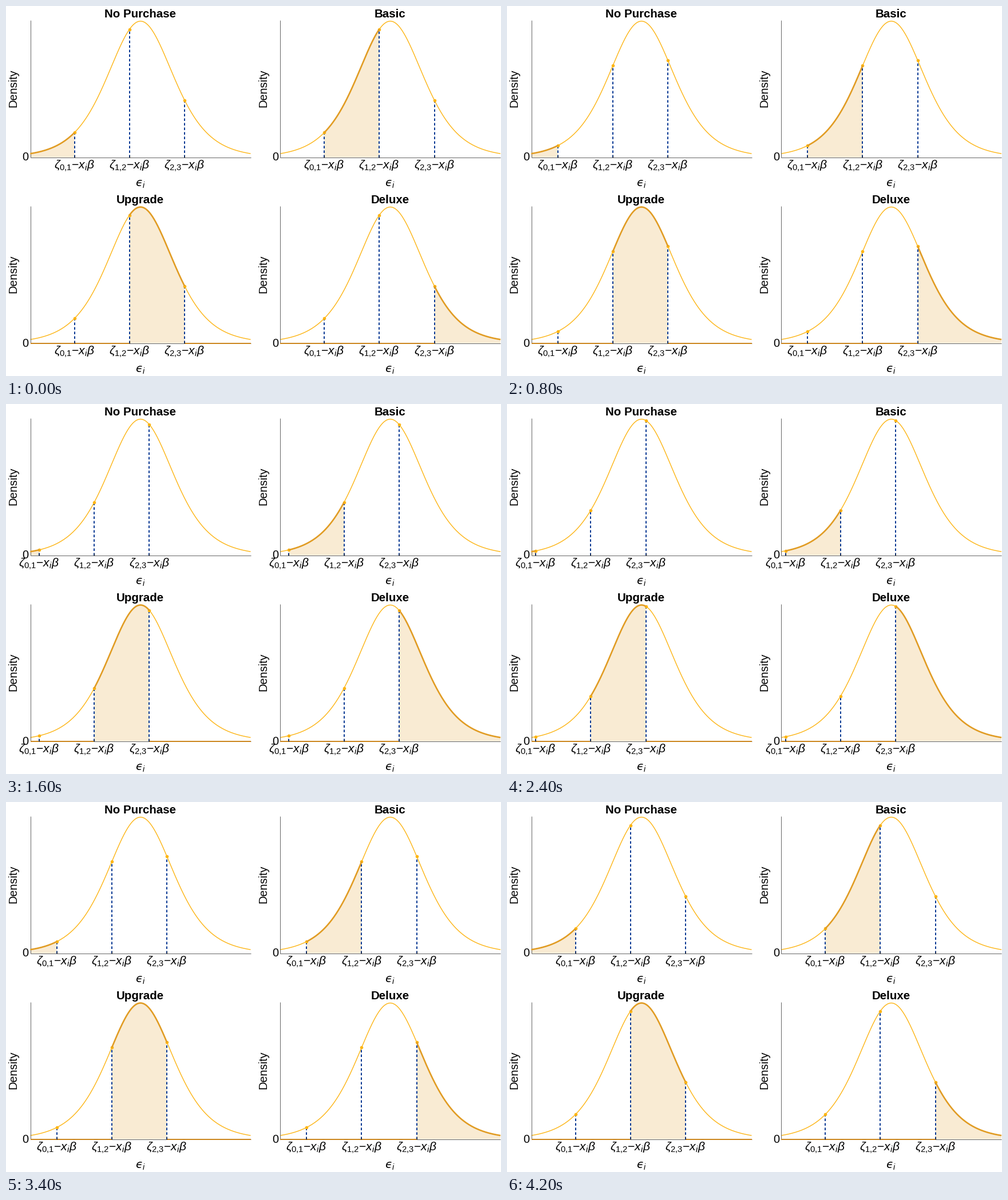
A matplotlib script that plays this animation: 865x647 px, repeating every 4.4 s.

```python
import numpy as np
import matplotlib.pyplot as plt
from matplotlib.animation import FuncAnimation

WIDTH, HEIGHT, DPI = 865, 647, 64
PT = 72 / DPI  # points per pixel

GOLD, ORANGE, BLUE, GRAY = "#fdb515", "#e19c24", "#0c3a94", "#666666"
UNIT = 38.5  # pixels per unit of epsilon
PEAK = 238   # pixel height of the density mode
EDGE = 5     # epsilon runs over [-EDGE, EDGE]
GAP = 2.5    # spacing of the cut points
STEPS = 11   # positions in each sweep direction

plt.rcParams.update({
    "font.family": "Liberation Sans",
    "mathtext.fontset": "custom",
    "mathtext.rm": "Liberation Sans",
    "mathtext.it": "Liberation Sans:italic",
    "mathtext.cal": "DejaVu Sans:italic",
})

fig = plt.figure(figsize=(WIDTH / DPI, HEIGHT / DPI), dpi=DPI, facecolor="white")
ax = fig.add_axes([0, 0, 1, 1])
ax.set_xlim(0, WIDTH)
ax.set_ylim(HEIGHT, 0)
ax.axis("off")


def density(x):
    """Logistic density scaled to a mode of one."""
    return 1 / np.cosh(np.asarray(x) / 2) ** 2


def stroke(xs, ys, color, width, **style):
    style = {"solid_capstyle": "butt", "dash_capstyle": "butt", **style}
    return ax.plot(xs, ys, color=color, lw=width * PT, **style)[0]


def write(x, y, text, size=20, **style):
    style = {"ha": "center", "va": "baseline", "zorder": 8, **style}
    return ax.text(x, y, text, fontsize=size * PT, color="black", **style)


class Panel:
    def __init__(self, title, region, center, base):
        self.region, self.center, self.base = region, center, base
        left, right = self.px(-EDGE), self.px(EDGE)

        write(center - 0.5, base - 244.5, title, 20.5, weight="bold")
        write(left - 24, base - 120.5, "Density", rotation=90, rotation_mode="anchor")
        write(left - 8.5, base + 6, "0")
        write(center - 0.5, base + 51.5, r"$\mathcal{ϵ}_i$")

        stroke([left, left], [base - 239.5, base + 0.5], GRAY, 1, zorder=3)
        stroke([left, right], [base, base], GRAY, 1, zorder=3)
        x = np.linspace(-EDGE, EDGE, 400)
        stroke(self.px(x), self.py(x), GOLD, 1.4, zorder=2)

        self.fill = ax.fill([left, left, left], [base] * 3, color=ORANGE,
                            alpha=0.2, lw=0, zorder=1)[0]
        self.curve = stroke([], [], ORANGE, 2.6, zorder=6)
        self.zeros = [stroke([], [], "#cb861e", 2, zorder=4) for _ in range(2)]
        self.drops = [stroke([], [], BLUE, 2, zorder=4,
                             dashes=(2.25, 1.75)) for _ in range(3)]
        self.ticks = [stroke([], [], "#222222", 1, zorder=4) for _ in range(3)]
        self.dots = stroke([], [], GOLD, 0, marker="o", ms=5.6 * PT, mew=0, zorder=5)
        self.labels = [
            write(0, base + 20, rf"$\zeta_{{{k}{{,}}{k + 1}}}{{-}}x_i\beta$", 21)
            for k in range(3)
        ]

    def px(self, x):
        return self.center + UNIT * np.asarray(x)

    def py(self, x):
        return self.base - PEAK * density(x)

    def update(self, cuts):
        bounds = [-EDGE, *cuts, EDGE]
        low, high = bounds[self.region], bounds[self.region + 1]
        x = np.linspace(low, high, 200)
        xs, ys = self.px(x), self.py(x)
        self.curve.set_data(xs, ys)
        outline = np.column_stack([xs, ys])
        corners = [[xs[-1], self.base], [xs[0], self.base]]
        self.fill.set_xy(np.vstack([outline, corners]))

        # The lower panels also trace the zero level outside their region.
        if self.region >= 2:
            for line, span in zip(self.zeros, ([-EDGE, low], [high, EDGE])):
                line.set_data(self.px(span), [self.base] * 2)

        self.dots.set_data(self.px(cuts), self.py(cuts))
        for cut, drop, tick, label in zip(cuts, self.drops, self.ticks, self.labels):
            at = self.px(cut)
            drop.set_data([at, at], [self.base, self.py(cut)])
            tick.set_data([at, at], [self.base, self.base - 4])
            label.set_x(at - 0.5)


TITLES = ("No Purchase", "Basic", "Upgrade", "Deluxe")
panels = [
    Panel(title, k, 235 + 436.5 * (k % 2), 264.5 + 325 * (k // 2))
    for k, title in enumerate(TITLES)
]


def update(frame):
    step = min(frame, 2 * STEPS - 1 - frame)  # there and back, ends held twice
    cuts = -3 - 0.2 * step + GAP * np.arange(3)
    for panel in panels:
        panel.update(cuts)


anim = FuncAnimation(fig, update, frames=2 * STEPS, interval=200,
                     init_func=lambda: update(0), repeat=True, repeat_delay=0)
plt.show()
```
